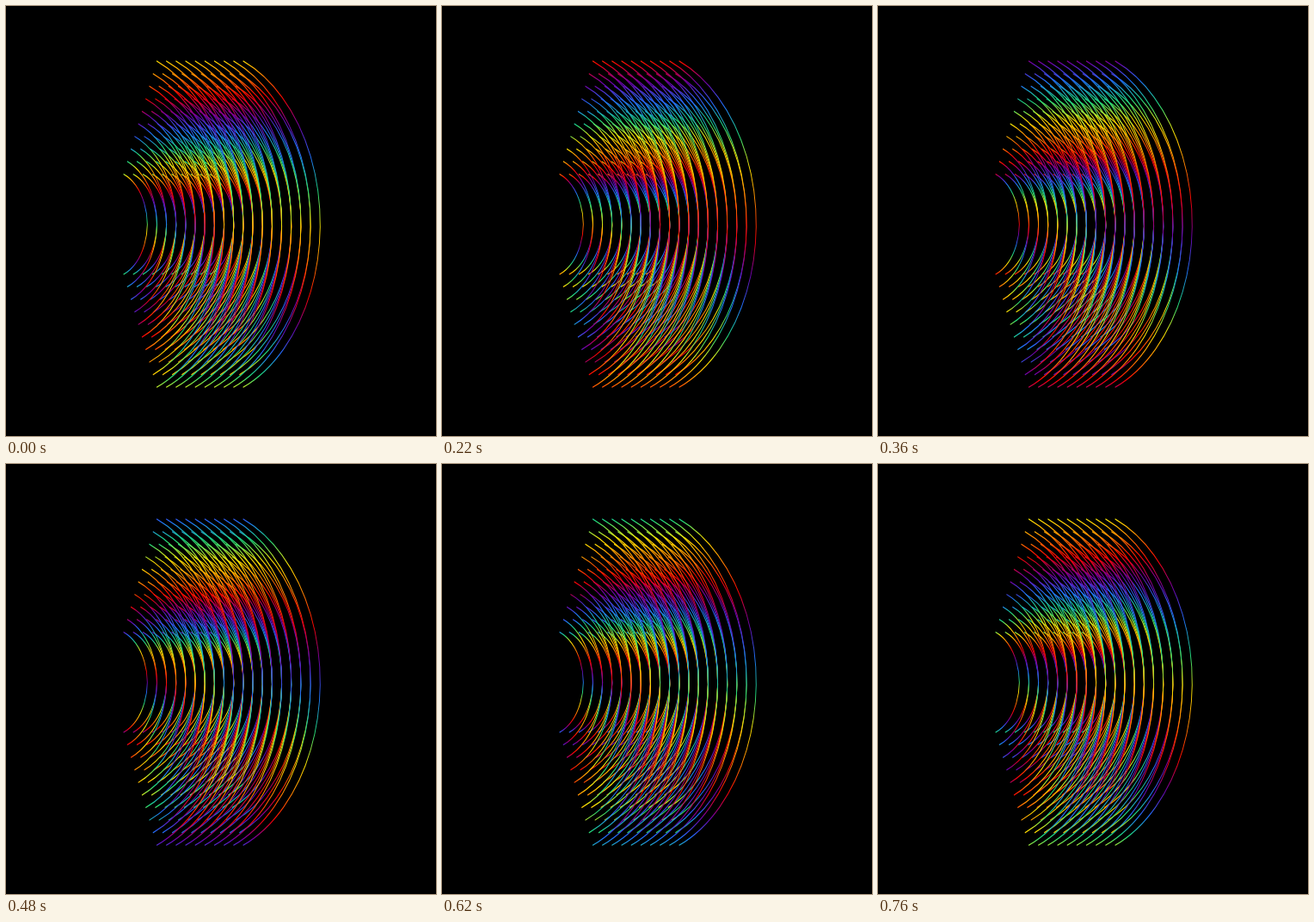
An HTML page with a canvas that plays this animation: 500 by 500 pixels, repeating every 780 ms.

```html
<!DOCTYPE html>
<html lang="en">
<head>
<meta charset="utf-8">
<title>Rainbow arcs</title>
<style>
  html, body { margin: 0; width: 100%; height: 100%; overflow: hidden; background: #000; }
  canvas { display: block; }
</style>
</head>
<body>
<canvas id="stage" width="500" height="500"></canvas>
<script>
const ctx = document.getElementById('stage').getContext('2d');

const LOOP = 780, TICK = 20;
const COUNT = 10;                       // sizes, and copies of each size
const TILT = Math.SQRT1_2;              // circles seen at 45 degrees
const STEP = 15.8, MIN_RADIUS = 4 * STEP;
const FIRST_X = 119.5, CENTER_Y = 253.7;
const HALF_ANGLE = Math.PI * 3 / 8;
const CYCLES = 1.94;                    // colour cycles along one arc
const SAMPLES = 72;

const PALETTE = [
  [255, 0, 0], [255, 128, 0], [255, 228, 0],
  [30, 222, 125], [30, 115, 255], [112, 0, 172]
];

function rainbow(u) {
  const p = (u - Math.floor(u)) * PALETTE.length;
  const i = Math.floor(p) % PALETTE.length;
  const next = PALETTE[(i + 1) % PALETTE.length];
  const mix = PALETTE[i].map((c, n) => Math.round(c + (next[n] - c) * (p - Math.floor(p))));
  return `rgb(${mix})`;
}

// Each arc is monotonic in y, so a vertical gradient can follow its angle.
function arcGradient(radius, phase) {
  const reach = radius * Math.sin(HALF_ANGLE);
  const gradient = ctx.createLinearGradient(0, -reach, 0, reach);
  for (let i = 0; i <= SAMPLES; i++) {
    const s = i / SAMPLES;
    const y = Math.sin((2 * s - 1) * HALF_ANGLE) / Math.sin(HALF_ANGLE);
    gradient.addColorStop(Math.min(1, Math.max(0, (1 + y) / 2)), rainbow(phase - CYCLES * s));
  }
  return gradient;
}

function draw(time) {
  const progress = Math.floor((time % LOOP) / TICK) * TICK / LOOP;
  ctx.setTransform(1, 0, 0, 1, 0, 0);
  ctx.fillStyle = '#000';
  ctx.fillRect(0, 0, 500, 500);

  // Stroking in tilted space also thins the upright parts of each arc.
  ctx.setTransform(TILT, 0, 0, 1, FIRST_X, CENTER_Y);
  ctx.lineWidth = 1.3;
  for (let size = 0; size < COUNT; size++) {
    const radius = MIN_RADIUS + STEP * size;
    ctx.strokeStyle = arcGradient(radius, 0.42 + size / COUNT - progress);
    ctx.beginPath();
    for (let copy = 0; copy < COUNT; copy++) {
      const x = STEP * copy;
      ctx.moveTo(x + radius * Math.cos(HALF_ANGLE), -radius * Math.sin(HALF_ANGLE));
      ctx.arc(x, 0, radius, -HALF_ANGLE, HALF_ANGLE);
    }
    ctx.stroke();
  }
}

const start = performance.now();
function frame() {
  draw(performance.now() - start);
  requestAnimationFrame(frame);
}
frame();
</script>
</body>
</html>
```
